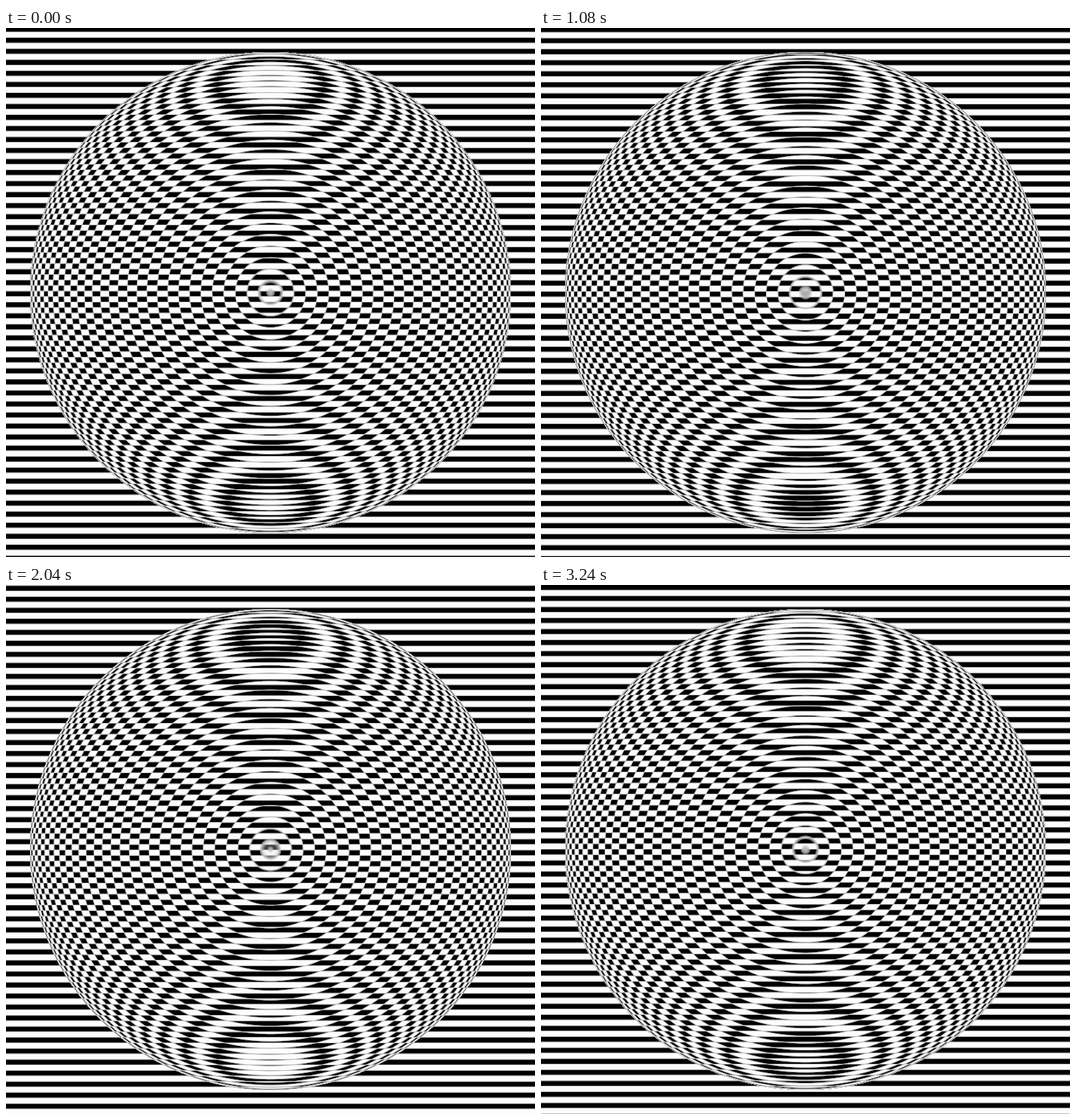
Write an HTML page with a canvas that moves like this. It is 748 px wide and 748 px high and loops after 3.36 s.

```html
<!DOCTYPE html>
<html lang="en">
<head>
<meta charset="utf-8">
<title>Striped sphere</title>
<style>
  html, body { margin: 0; width: 100%; height: 100%; overflow: hidden; background: #fff; }
  canvas { display: block; width: 100vw; height: 100vh; }
</style>
</head>
<body>
<canvas id="stage" width="748" height="748"></canvas>
<script>
  const SIZE = 748, CENTER = SIZE / 2, RADIUS = 340.5;
  const STRIPE = SIZE / 48;      // height of one black and white pair
  const STRIPE_TOP = -2.1;       // first black edge at time zero
  const RINGS = 16;              // ring pairs from the pole to the rim
  const EDGE = 1.8;              // width of a soft edge
  const STEPS = 28, STEP_MS = 120;
  const WHITE = 253, GAMMA = 2.2;

  const start = performance.now();
  const ctx = document.getElementById('stage').getContext('2d');
  const image = ctx.createImageData(SIZE, SIZE);
  const pixels = new Uint32Array(image.data.buffer);

  // Square wave, 1 in the first half of each cycle; gain sets edge sharpness.
  function wave(phase, gain) {
    const f = phase - Math.floor(phase);
    const d = f < 0.5 ? Math.min(f, 0.5 - f) : -Math.min(f - 0.5, 1 - f);
    return Math.max(0, Math.min(1, 0.5 + d * gain));
  }

  // Rings are evenly spaced in latitude and seen from above the pole.
  const ringPhase = new Float32Array(SIZE * SIZE);
  const ringGain = new Float32Array(SIZE * SIZE);
  const inside = new Uint8Array(SIZE * SIZE);
  for (let y = 0, i = 0; y < SIZE; y++) {
    for (let x = 0; x < SIZE; x++, i++) {
      const r = Math.hypot(x + 0.5 - CENTER, y + 0.5 - CENTER);
      if (r >= RADIUS) continue;
      const angle = Math.asin(r / RADIUS);
      const cycle = RADIUS * Math.cos(angle) * Math.PI / (2 * RINGS);
      inside[i] = 1;
      ringPhase[i] = angle * 2 * RINGS / Math.PI + 0.51;
      ringGain[i] = cycle / Math.max(EDGE, 90 / r);   // soft near the pole
    }
  }

  // Edges blend in linear light, so half coverage is a light grey.
  const grey = Uint32Array.from({ length: 256 }, (_, light) => {
    const v = Math.round(WHITE * (light / 255) ** (1 / GAMMA));
    return (0xff000000 | v << 16 | v << 8 | v) >>> 0;
  });

  function draw(step) {
    const t = step / STEPS;
    for (let y = 0, i = 0; y < SIZE; y++) {
      const stripe = wave((y + 0.5 - STRIPE_TOP) / STRIPE + 3 * t, STRIPE / EDGE);
      for (let x = 0; x < SIZE; x++, i++) {
        const ring = inside[i] ? wave(ringPhase[i] + t, ringGain[i]) : 0;
        const black = stripe + ring - 2 * stripe * ring;
        pixels[i] = grey[Math.round(255 * (1 - black))];
      }
    }
    ctx.putImageData(image, 0, 0);
  }

  let shown = -1;
  function tick() {
    const step = Math.floor((performance.now() - start) / STEP_MS) % STEPS;
    if (step !== shown) draw(shown = step);
    requestAnimationFrame(tick);
  }
  tick();
</script>
</body>
</html>
```
